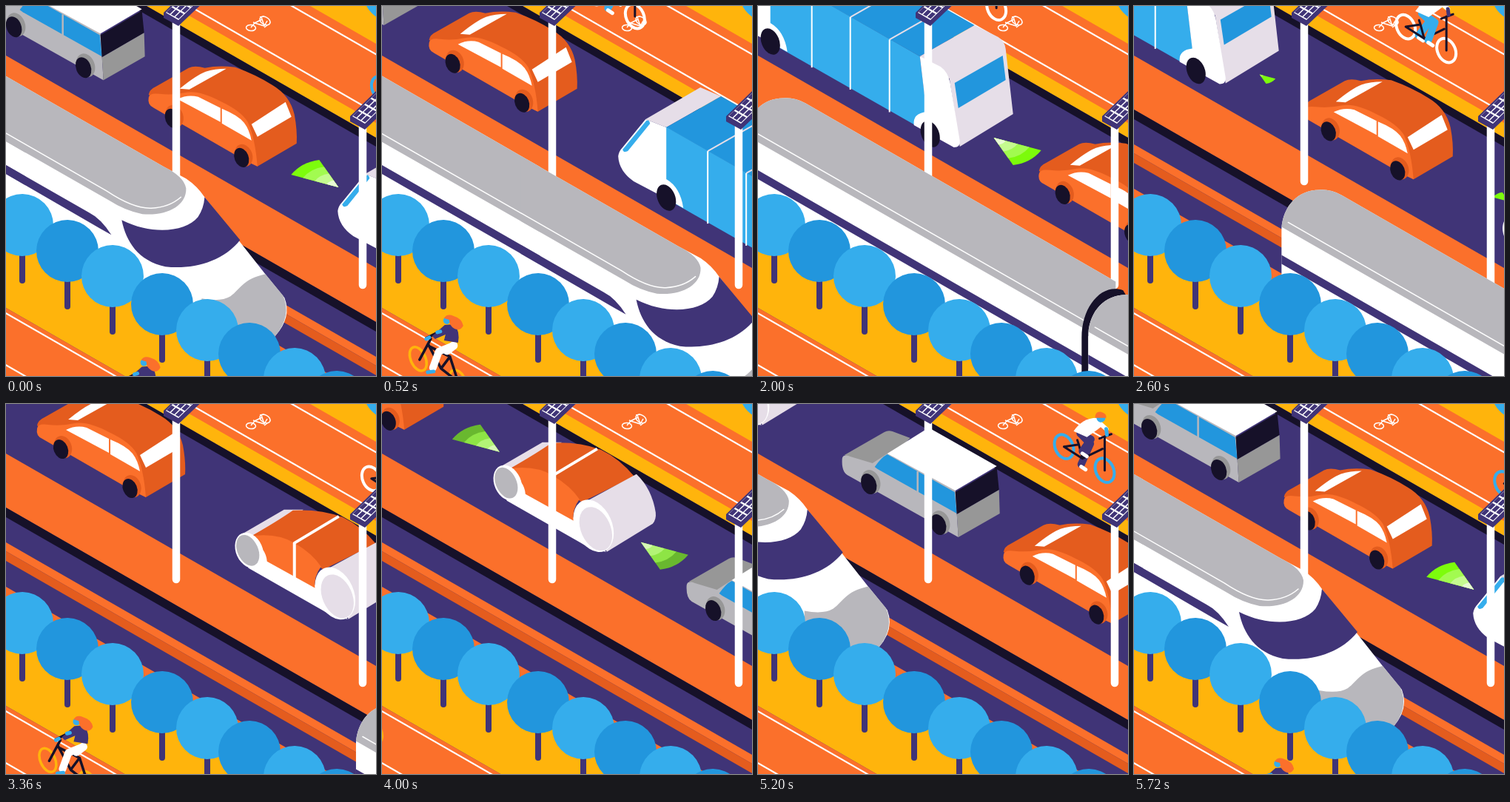
Write an HTML page with a canvas that moves like this. It is 500x500 px and loops after 5.76 s.

```html
<!DOCTYPE html>
<html lang="en">
<head>
<meta charset="utf-8">
<title>Isometric street</title>
<style>
html, body { margin: 0; width: 100%; height: 100%; overflow: hidden; background: #403477; }
canvas { display: block; width: 500px; height: 500px; }
</style>
</head>
<body>
<canvas id="stage" width="500" height="500"></canvas>
<script>
const g = document.getElementById('stage').getContext('2d');
const LOOP = 5760, SLOPE = 0.574;
const PURPLE = '#403477', ORANGE = '#fb702b', RUST = '#e45c1e', YELLOW = '#ffb40c',
  DARK = '#161129', SKY = '#35adec', BLUE = '#2296dd', GRAY = '#b8b7bc',
  STONE = '#979797', WHITE = '#fff', LILAC = '#e6dee8';

const paths = {};
const path = d => paths[d] || (paths[d] = new Path2D(d));
function fill(color, d) { g.fillStyle = color; g.fill(path(d)); }
function line(color, width, d) {
  g.strokeStyle = color;
  g.lineWidth = width;
  g.stroke(path(d));
}
function oval(color, x, y, rx, ry = rx, tilt = -0.38, stroke = 0) {
  g.beginPath();
  g.ellipse(x, y, rx, ry, tilt, 0, 7);
  if (stroke) {
    g.strokeStyle = color;
    g.lineWidth = stroke;
    g.stroke();
  } else {
    g.fillStyle = color;
    g.fill();
  }
}
// Time since ref, wrapped to start at -before
const since = (t, ref, period = LOOP, before = period / 2) =>
  ((t - ref + before) % period + period) % period - before;
function at(x, y, draw) {
  g.save();
  g.translate(x, y);
  draw();
  g.restore();
}
const along = (d, draw) => at(d, d * SLOPE, draw);

// Diagonal strip between two heights on the left edge
function strip(color, top, bottom) {
  const drop = 500 * SLOPE;
  fill(color, `M0 ${top}L500 ${top + drop}V${bottom + drop}L0 ${bottom}Z`);
}

function ground() {
  g.fillStyle = PURPLE;
  g.fillRect(0, 0, 500, 500);
  strip(YELLOW, -400, -109);
  strip(ORANGE, -236, -129);
  strip(WHITE, -223, -220.5);
  strip(WHITE, -143.5, -141);
  strip(DARK, -109, -97);
  strip(ORANGE, 67, 140);
  strip(DARK, 140, 153);
  strip(ORANGE, 187, 199);
  strip(RUST, 199, 212);
  strip(ORANGE, 247, 264);
  strip(YELLOW, 264, 408);
  strip(ORANGE, 408, 800);
  strip(WHITE, 414, 416.5);
  strip(WHITE, 484, 486.5);
  oval(SKY, 524, -20, 42);
  oval(WHITE, 331, 29.5, 6.5, 4, 0.1, 1.5);
  oval(WHITE, 350, 20, 7.5, 5, 0.5, 1.5);
  line(WHITE, 1.5, 'M331 29L336 23L349 27L353 20M336 23L346 18L349 27M345 15L346 18M349 29L353 26M334 22L339 24M343 15L349 14');
}

function cyclist(t, look) {
  const a = t / LOOP * 12 * Math.PI + 2.2;
  const foot = s => [24 + s * 7 * Math.cos(a), 16 + s * 9 * Math.sin(a)];
  const leg = (s, color) => {
    const [x, y] = foot(s);
    line(color, 10, `M22 -17L${(36 + (x - 24) / 2).toFixed(1)} ${(-6 + (y - 16) / 3).toFixed(1)}L${x.toFixed(1)} ${y.toFixed(1)}`);
    line(WHITE, 5, `M${x.toFixed(1)} ${(y + 3).toFixed(1)}l6 4`);
  };
  oval(look.wheel, 0, 1, 12, 17, -0.42, 4);
  oval(look.wheel, 55, 33, 12, 17, -0.42, 4);
  leg(-1, look.pants);
  line(DARK, 3, 'M0 1L20 -2L25 17L0 1M25 17L52 4M20 -2L18 -8M55 33V-13M48 -10L64 -16');
  leg(1, look.pants);
  fill(look.top, 'M13 -20Q25 -38 44 -38L54 -29L45 -22L31 -12Z');
  line(look.top, 6, 'M48 -31L57 -23');
  line(look.skin, 5, 'M57 -23L58 -15');
  oval(look.skin, 50, -38, 6);
  fill(look.hat, 'M42 -38Q42 -47 50 -46Q58 -44 57 -38Z');
}
const bikes = [
  { ref: 1440, x: 440, y: 69, wheel: WHITE, pants: SKY, top: WHITE, skin: PURPLE, hat: ORANGE },
  { ref: 2600, x: 367, y: 27, wheel: WHITE, pants: SKY, top: WHITE, skin: PURPLE, hat: ORANGE },
  { ref: 4640, x: 320, y: 3, wheel: SKY, pants: PURPLE, top: WHITE, skin: SKY, hat: ORANGE }
];

function commuter() {
  oval(YELLOW, 49, 477, 10, 17, -0.42, 3.5);
  oval(YELLOW, 103, 508, 10, 17, -0.42, 3.5);
  line(DARK, 3.5, 'M51 478L66 450M63 458L80 490L103 508M64 460L92 474L80 490M92 474L103 508M60 449L80 439');
  line(WHITE, 11, 'M97 459L88 466');
  line(WHITE, 10, 'M97 459L77 467L69 489');
  line(SKY, 5, 'M62 495L70 494');
  fill(PURPLE, 'M85 431L98 430Q106 440 103 455L84 452L86 444L72 450L68 446Z');
  line(SKY, 5, 'M60 450L64 448M75 441L79 440');
  oval(SKY, 88, 425, 5);
  fill(ORANGE, 'M84 422Q88 415 97 419Q108 422 110 432Q106 440 98 436Q91 432 91 424Z');
}

function wheel(x, y, rx, ry, arch) {
  if (arch) oval(arch, x + 3, y - 3, rx + 2, ry + 2);
  oval(DARK, x, y, rx, ry);
}

function orangeCar() {
  fill(RUST, 'M193 120Q194 113 203 109L247 84Q255 80 269 84Q287 80 310 83Q338 93 360 107Q384 121 390 147Q394 168 393 186L340 217L240 160Z');
  fill(ORANGE, 'M193 124Q194 117 208 119Q226 121 244 117Q262 114 290 129Q318 142 327 157Q337 179 340 217L325 210L200 138Q191 134 193 124Z');
  fill(WHITE, 'M235 112Q257 94 270 89Q282 85 298 85L248 113Z');
  fill(WHITE, 'M232 126Q246 119 260 123L290 138V157Z');
  fill(WHITE, 'M292 139Q314 148 322 158Q329 167 332 182L292 159Z');
  fill(WHITE, 'M332 160L378 130L386 150L340 177Z');
  wheel(225, 152, 9.5, 13.5, RUST);
  wheel(318.5, 205, 9.5, 13.5, RUST);
}

function bus() {
  fill(LILAC, 'M128 22L202 -21L230 -9L156 33Z');
  fill(BLUE, 'M156 33L230 -9L432 106L358 148Z');
  fill(SKY, 'M155 32L358 148L371 252L155 129Z');
  fill(WHITE, 'M128 22L156 33V103Q175 114 179 142L150 126L112 106Q92 92 91 72Q92 65 97 60Z');
  fill(SKY, 'M129 24Q133 22 134 28L104 65Q98 68 97 63Z');
  fill(LILAC, 'M358 148L432 106L464 122Q473 128 474 138L484 226L412 270L398 178Z');
  fill(WHITE, 'M358 148L386 162Q396 169 399 184L412 262Q413 271 404 271L350 241Q348 225 367 223Z');
  fill(BLUE, 'M405 184L470 147L474 180L410 218Z');
  for (const x of [212, 264, 317]) {
    const y = 33 + (x - 156) * SLOPE;
    line(LILAC, 2, `M${x} ${y}l74 -42`);
    line(WHITE, 2, `M${x} ${y}V${y + 98}`);
  }
  wheel(156, 128, 12, 18.5);
  wheel(372, 253, 12, 18.5);
}

function pod() {
  fill(LILAC, 'M314 179L376 143L402 143L350 190Z');
  fill(RUST, 'M333 178Q368 158 388 144Q424 142 455 153Q480 165 500 189L429 224L385 190Z');
  fill(WHITE, 'M311 185L342 182L356 211L420 246L462 291Q442 289 428 279L328 222Z');
  fill(ORANGE, 'M328 179Q366 173 390 188Q414 202 426 220Q416 233 418 249L353 213Q352 195 328 179Z');
  line(WHITE, 4, 'M390 235V188L450 152');
  fill(LILAC, 'M433 224L503 186Q524 206 529 238Q530 247 525 253L463 291Z');
  oval(WHITE, 445, 256, 25, 37, -0.42);
  oval(LILAC, 448, 260, 20, 31, -0.42);
  oval(WHITE, 329, 198, 18, 25, -0.42);
  oval(GRAY, 327, 198, 14, 22, -0.42);
}

function grayCar() {
  fill(STONE, 'M256 149L310 118Q315 115 321 117L345 126L310 162L285 161Z');
  fill(GRAY, 'M253 154Q254 147 264 151L294 160L314 147L406 196L410 260L260 176Q252 171 253 154Z');
  fill(BLUE, 'M297 165Q306 152 314 148L405 199L408 228L301 168Z');
  line(GRAY, 2.5, 'M355 171V199');
  fill(DARK, 'M406 199L462 166L465 196L408 229Z');
  fill(STONE, 'M408 229L465 196L466 228L410 260Z');
  fill(WHITE, 'M314 147L370 112L462 164L406 197Z');
  wheel(289, 188, 10, 14.5, STONE);
  wheel(383, 243, 10, 14.5, STONE);
}

// Sensor cone, pointing forward (1) or backward (-1)
function signal(t, x, y, dir) {
  const p = t % 960;
  const size = p < 560 ? 1 : Math.min(1, (p - 560) / 360);
  const alpha = p < 560 ? Math.max(0, 1 - Math.max(0, p - 80) / 240) : 1;
  g.save();
  g.globalAlpha = alpha;
  g.translate(x, y);
  ['#7dfc0c', '#a2fb50', '#c5fb90', '#e8fbd4'].forEach((color, i) => {
    const s = Math.max(0, size - i * 0.25) * dir;
    g.beginPath();
    g.moveTo(0, 0);
    g.lineTo(-64 * s, -17 * s);
    g.quadraticCurveTo(-50 * s, -34 * s, -26 * s, -37 * s);
    g.fillStyle = color;
    g.fill();
  });
  g.restore();
}

const vehicles = [
  { ref: 0, draw: orangeCar },
  { ref: 1440, draw: bus, cones: [[92, 40, 1], [458, 258, -1]] },
  { ref: 2600, draw: () => at(38, 17.5, orangeCar) },
  { ref: 3360, draw: pod, cones: [[318, 156, 1], [509, 278, -1]] },
  { ref: 4640, draw: grayCar }
];

function lamp() {
  line(WHITE, 10.5, 'M230 20V237');
  fill(PURPLE, 'M213 9L249 -26L270 -15V-8L233 27L213 16Z');
  fill(WHITE, 'M216 9L249 -23L267 -14L233 19Z');
  g.save();
  g.transform(19, 10.5, 35, -34, 214.5, 9);
  g.fillStyle = PURPLE;
  for (let i = 0; i < 3; i++)
    for (let j = 0; j < 4; j++) g.fillRect(0.06 + i * 0.31, 0.04 + j * 0.24, 0.24, 0.19);
  g.restore();
}

const BACK = 'M0 186C2 156 22 134 51 134Q66 133 81 141';
function carriage(length, stripe) {
  const y = h => h + length * SLOPE;
  fill(WHITE, `${BACK}L${length} ${y(95)}V${y(266)}L0 266Z`);
  fill(GRAY, `${BACK}L${length} ${y(95)}V${y(183)}L0 184Z`);
  fill(PURPLE, `M0 ${stripe}L${length} ${y(stripe)}V${y(stripe + 12)}L0 ${stripe + 12}Z`);
  line(WHITE, 1.5, `M9 178L${length} ${y(172)}`);
}

function train() {
  along(-737, () => carriage(500, 222));
  fill(WHITE, 'M0 95L213 217L243 233Q258 243 268 258L350 362L376 394Q386 420 364 445L330 490L0 266Z');
  along(-274, () => {
    fill(DARK, 'M-9 260V192C-9 150 18 118 47 128L54 140L0 190V260Z');
    carriage(300, 215);
  });
  fill(GRAY, 'M0 95L213 217Q240 230 243 246C244 270 216 284 184 281Q160 276 140 263L0 183Z');
  line(WHITE, 1.5, 'M0 172L136 250Q172 274 196 273Q220 272 236 258');
  fill(PURPLE, 'M0 215L112 279Q128 287 142 309L126 300L0 227Z');
  fill(PURPLE, 'M268 258L316 316C292 346 252 356 215 352C178 344 162 318 156 289C198 310 242 305 259 285Q267 273 268 258Z');
  fill(GRAY, 'M350 362L374 391Q386 418 364 445L330 490L264 440V395Q290 400 303 392C317 382 319 369 350 362Z');
}

function trees() {
  [[22, 296], [83, 331], [144, 365], [211, 403], [272, 438], [329, 470], [390, 504], [447, 535]]
    .forEach(([x, y], i) => {
      line(PURPLE, 8, `M${x} ${y}V${y + 75}`);
      oval(i % 2 ? BLUE : SKY, x, y, 42);
    });
}

function draw(t) {
  g.lineCap = 'butt';
  ground();
  g.lineCap = g.lineJoin = 'round';
  for (const b of bikes)
    along(since(t, b.ref) * 0.1667, () => at(b.x, b.y, () => cyclist(t, b)));
  g.lineCap = 'butt';
  for (const v of vehicles)
    along(since(t, v.ref) * -0.2483, () => {
      v.draw();
      for (const c of v.cones || []) signal(t, ...c);
    });
  g.lineCap = 'round';
  lamp();
  at(252, 140, lamp);
  along(since(t, 0, LOOP, 1200) * 0.36, train);
  trees();
  along(since(t, 520, LOOP / 2) * -0.19, commuter);
}

const start = performance.now();
function tick() {
  draw((performance.now() - start) % LOOP);
  requestAnimationFrame(tick);
}
tick();
</script>
</body>
</html>
```
